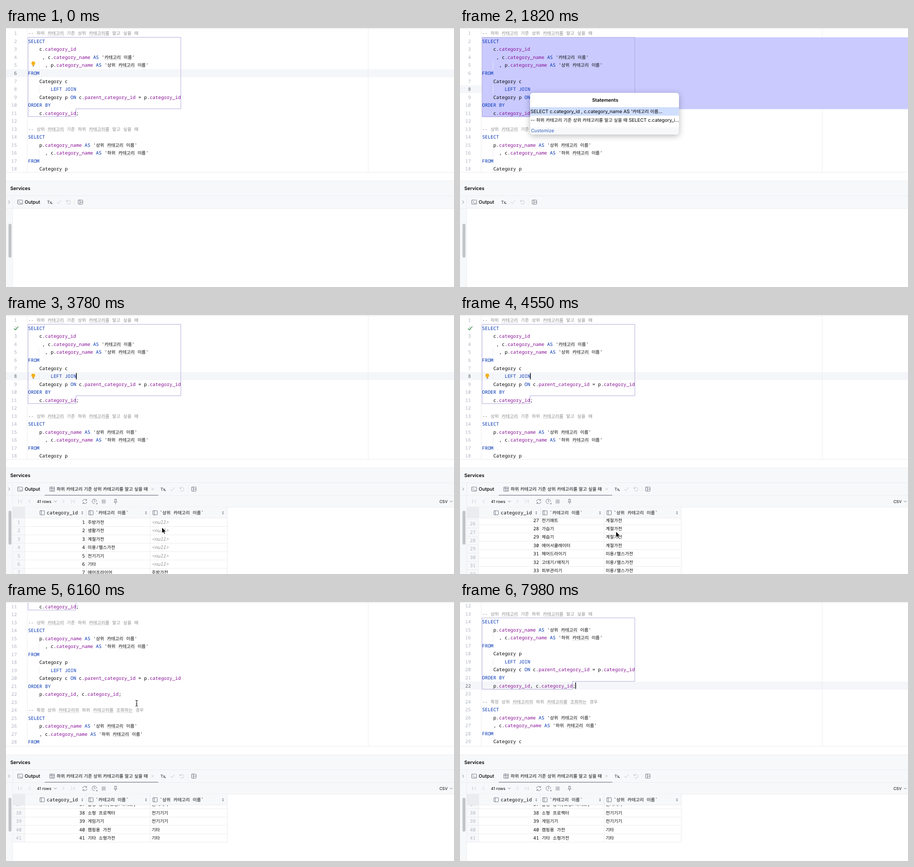
Animation of 984 by 569 pixels, one loop 8 s. Source, as an HTML page:

```html
<!DOCTYPE html>
<html lang="ko">
<head>
<meta charset="utf-8">
<title>SQL console</title>
<style>
html, body { margin: 0; width: 100%; height: 100%; overflow: hidden; background: #fff; }
svg { display: block; width: 984px; height: 569px; }
text { white-space: pre; text-rendering: geometricPrecision; }
.m { font: 500 10.355px "Noto Sans Mono", "Liberation Mono", monospace; }
.s { font-family: Inter, "Noto Sans CJK KR", "Noto Sans CJK", sans-serif; }
.k { font-family: "Noto Sans CJK KR", "Noto Sans CJK", "Noto Sans KR", sans-serif; font-size: 9.78px; font-weight: 400; font-style: normal; }
.i { fill: none; stroke: #6c707e; stroke-width: .95; stroke-linecap: round; stroke-linejoin: round; }
.d { stroke: #bfc2cc; }
</style>
</head>
<body>
<svg id="stage" viewBox="0 0 984 569" xmlns="http://www.w3.org/2000/svg"></svg>
<script>
(() => {
const LOOP = 8000, STEP = 70;
const CW = 6.213, KW = 9, X0 = 48.5, LH = 17.52, RH = 18.4;
const GREY = '#f7f8fa', LINE = '#ebecf0', INK = '#080808', DIM = '#aeb3c2';

const code = `-- 하위 카테고리 기준 상위 카테고리를 알고 싶을 때
SELECT
    c.category_id
     , c.category_name AS '카테고리 이름'
      , p.category_name AS '상위 카테고리 이름'
FROM
    Category c
        LEFT JOIN
    Category p ON c.parent_category_id = p.category_id
ORDER BY
    c.category_id;

-- 상위 카테고리 기준 하위 카테고리를 알고 싶을 때
SELECT
    p.category_name AS '상위 카테고리 이름'
      , c.category_name AS '하위 카테고리 이름'
FROM
    Category p
        LEFT JOIN
    Category c ON c.parent_category_id = p.category_id
ORDER BY
    p.category_id, c.category_id;

-- 특정 상위 카테고리의 하위 카테고리를 조회하는 경우
SELECT
    p.category_name AS '상위 카테고리 이름'
    , c.category_name AS '하위 카테고리 이름'
FROM
    Category c
        LEFT JOIN`.split('\n');

const items = ('주방가전,생활가전,계절가전,미용/헬스가전,전기기기,기타,' +
  '에어프라이어,전자레인지,전기밥솥,커피머신,믹서기/블렌더,토스터기,전기포트,식기세척기,인덕션,정수기,' +
  '청소기,로봇청소기,세탁기,건조기,공기청정기,다리미,의류관리기,' +
  '선풍기,에어컨,히터,전기매트,가습기,제습기,에어서큘레이터,' +
  '헤어드라이기,고데기/매직기,피부관리기,안마기,체중계,' +
  '무선 스피커,촬영 장비(조명/마이크),소형 프로젝터,게임기기,캠핑용 가전,기타 소형가전').split(',');
const groupEnds = [16, 23, 30, 35, 39, 41];

// drawing helpers
const runs = s => s.match(/[가-힣]+|[^가-힣]+/g) || [];
const isKo = s => /[가-힣]/.test(s);
const width = s => [...s].reduce((w, c) => w + (isKo(c) ? KW : CW), 0);
const esc = s => s.replace(/&/g, '&amp;').replace(/</g, '&lt;');
const rect = (x, y, w, h, fill, more = '') =>
  `<rect x="${x}" y="${y}" width="${w}" height="${h}" fill="${fill}" ${more}/>`;
const icon = (d, more = '') => `<path class="i ${more}" d="${d}"/>`;
const hline = (x, y, w) => rect(x, y, w, 1, LINE);
const vline = (x, y, h) => rect(x, y, 1, h, LINE);

function mono(x, y, s, fill = INK, more = '') {
  let out = '';
  for (const r of runs(s)) {
    out += `<tspan x="${x.toFixed(2)}"${isKo(r) ? ' class="k"' : ''}>${esc(r)}</tspan>`;
    x += width(r);
  }
  return `<text class="m" y="${(y + 3.7).toFixed(2)}" fill="${fill}" ${more}>${out}</text>`;
}

function sans(x, y, s, size = 10.4, weight = 400, fill = '#000', more = '') {
  const body = runs(s).map(r => isKo(r) ? `<tspan class="k">${r}</tspan>` : esc(r)).join('');
  return `<text class="s" x="${x}" y="${y + 3.75}" font-size="${size}" font-weight="${weight}" fill="${fill}" ${more}>${body}</text>`;
}

const lineMid = n => 11.7 + (n - 1) * LH;
const lineTop = n => 2.94 + (n - 1) * LH;

function codeLine(s, i) {
  const y = lineMid(i + 1);
  let x = X0, out = '';
  const parts = s.startsWith('--') ? [s] :
    s.split(/(\b(?:SELECT|FROM|LEFT|JOIN|ORDER|BY|AS|ON)\b|(?<=\.)[a-z_]+)/);
  parts.forEach((p, j) => {
    const fill = j % 2 ? (/[A-Z]/.test(p) ? '#0033b3' : '#871094') : s.startsWith('--') ? '#8c8c8c' : INK;
    if (p.trim()) out += mono(x, y, p, fill);
    x += width(p);
  });
  for (const w of s.matchAll(/카테고리[를의]?|조회하는/g)) {
    const a = X0 + width(s.slice(0, w.index));
    out += `<path fill="none" stroke="#b9bcc0" stroke-width=".7" d="M${a} ${y + 6}${'l1.5 -1.5l1.5 1.5'.repeat(w[0].length * 3)}"/>`;
  }
  if (/^ {6}/.test(s)) out += vline(72, lineTop(i + 1), LH);
  return out;
}

function outline(id, from, to, notch) {
  const a = lineTop(from), b = lineTop(to) - .7, c = lineTop(to + 1) - 1;
  return `<path id="${id}" fill="none" stroke="#a99fd8" stroke-width=".9" d="M${X0} ${a}H384V${b}H${notch}V${c}H${X0}Z"/>`;
}

function editor() {
  const nums = code.map((_, i) => {
    const s = `${i + 1}`;
    return mono(24 - CW * s.length, lineMid(i + 1), s, DIM, `id="n${s}"`);
  }).join('');
  return `<g clip-path="url(#edit)"><g id="row">${rect(0, 0, 984, LH, '#f5f6f9')}</g>
    ${vline(46, 2, 315)}${vline(795, 2, 315)}
    <g id="code">
      <path id="sel" fill="#cacaff" d="M${X0} ${lineTop(2)}H984V${lineTop(11)}H153.8V${lineTop(12)}H${X0}Z"/>
      ${outline('box1', 2, 11, 153.6)}${outline('box2', 14, 22, 247.3)}
      ${code.map(codeLine).join('')}${nums}
      <path id="check" fill="none" stroke="#4c9a5b" stroke-width="1.5" d="M17.5 29.5l3.2 3.2l6.5 -7.5"/>
      <g id="bulb"><circle cx="60" cy="-1.5" r="4.2" fill="#f5b01d"/>${rect(58, 1.5, 4, 2.2, '#f5b01d')}${rect(58.2, 4.2, 3.6, 1.2, '#6c707e')}</g>
      <rect id="caret" width="1.5" height="14" fill="#000"/>
    </g></g>`;
}

function panel() {
  return rect(0, 317, 984, 252, '#fff') + hline(0, 316.5, 984) +
    rect(0, 336, 984, 60, GREY) + hline(0, 335.5, 984) + hline(0, 368, 984) + hline(0, 396, 984) +
    rect(0, 397, 14, 172, GREY) + vline(14, 369, 200) +
    rect(5.5, 430, 6.5, 74.5, '#c3c4c7', 'rx="3.2"') +
    sans(9.5, 352.5, 'Services', 10.4, 600) + icon('M5.5 379.5l3 3l-3 3') +
    icon('M26.5 378h9a1 1 0 0 1 1 1v7a1 1 0 0 1 -1 1h-9a1 1 0 0 1 -1 -1v-7a1 1 0 0 1 1 -1zM28 380.5l2 2l-2 2M31.5 385h3') +
    sans(41, 382.5, 'Output', 10.4, 500) +
    `<g id="tools">${sans(90.3, 382.5, 'Tx', 9, 500, '#3c3f48')}${rect(99.5, 384.5, 2, 2, '#3c3f48')}
      ${icon('M112 383l3 3l6 -7', 'd')}${icon('M133 378.5v3h3M133.3 381.2a4.3 4.3 0 1 1 .4 4', 'd')}
      ${vline(150, 375, 15)}${icon('M159.5 378h8a1 1 0 0 1 1 1v7a1 1 0 0 1 -1 1h-8a1 1 0 0 1 -1 -1v-7a1 1 0 0 1 1 -1zM162.3 378v9M162.3 382.5h6')}</g>`;
}

const grid = (x, y) => icon(`M${x} ${y}h10v9h-10zM${x} ${y + 3}h10M${x + 3.4} ${y}v9M${x + 6.8} ${y + 3}v6`);
const column = x => icon(`M${x + 1} 430h8a1 1 0 0 1 1 1v7a1 1 0 0 1 -1 1h-8a1 1 0 0 1 -1 -1v-7a1 1 0 0 1 1 -1zM${x + 3.2} 430v9`);
const sorter = x => `<path fill="#6c707e" d="M${x - 2} 433.6l2 -2.4l2 2.4zM${x - 2} 435.6l2 2.4l2 -2.4z"/>`;

function result() {
  const bar = rect(15, 397, 969, 25, GREY) + hline(15, 421.5, 969) +
    icon('M27.5 406v7M35 406l-3.5 3.5l3.5 3.5M53.5 406l-3.5 3.5l3.5 3.5M124.3 406l3.5 3.5l-3.5 3.5M142.5 406l3.5 3.5l-3.5 3.5M149.8 406v7', 'd') +
    sans(68, 409.7, '41 rows', 8.8) + icon('M106 408.5l2.5 2.5l2.5 -2.5') +
    icon('M168.3 409a4.8 4.8 0 0 1 8.6 -2.2M177.8 410.4a4.8 4.8 0 0 1 -8.6 2.2M177.2 404.8v2.4h-2.4M168.9 414.6v-2.4h2.4') +
    icon('M199 409.5a5 5 0 1 0 -5 5M194 406.5v3.3l2.2 1.2') + `<path fill="#6c707e" d="M197.5 415.5l3.2 -3.2v3.2z"/>` +
    rect(210, 405.2, 9, 9, '#c6c8ce', 'rx="1.2"') +
    icon('M238.3 405h4.6M239 405v4l-2 2h7.2l-2 -2v-4M240.6 411v4') +
    sans(952, 409.7, 'CSV', 8.7) + icon('M975.5 408.5l2.5 2.5l2.5 -2.5');
  const tab = grid(96.5, 378) + sans(111.3, 382.5, code[0].slice(3)) +
    icon('M319.7 380l4.8 4.8M324.5 380l-4.8 4.8', 'd') + rect(85, 395, 249.5, 1.8, '#9da0a8');
  const head = rect(15, 422, 471, 24, GREY) + rect(15, 422, 26, 24, '#ebecf0') +
    [41, 176, 316, 485.5].map(x => vline(x, 422, 24)).join('') + hline(15, 445.5, 471) +
    column(74.5) + column(181.5) + column(322.5) + [167.5, 307.5, 476.5].map(sorter).join('') +
    mono(89.5, 434.5, 'category_id') + mono(196.5, 434.5, '`카테고리 이름`') + mono(337.3, 434.5, '`상위 카테고리 이름`');
  const h = RH * items.length;
  let cells = '', side = rect(15, 446, 26, h, GREY);
  items.forEach((name, i) => {
    const n = i + 1, s = `${n}`, y = 455.2 + i * RH, line = 445.7 + n * RH;
    const parent = i > 5 && items[groupEnds.findIndex(e => n <= e)];
    side += mono(28 - s.length * CW / 2, y, s, DIM) + hline(15, line, 26);
    cells += mono(173.5 - s.length * CW, y, s) + mono(179.5, y, name) + hline(41, line, 445) +
      (parent ? mono(320, y, parent) : mono(320, y, '<null>', '#8c8c8c', 'font-style="italic" style="font-style:italic"'));
  });
  cells += [176, 316, 485.5].map(x => vline(x, 446, h)).join('');
  side += vline(40.5, 446, h);
  return `<g id="tab">${bar}${tab}</g><g id="table">
    <g clip-path="url(#body)"><g id="cells">${cells}</g><g id="side">${side}</g></g>${head}</g>`;
}

function popup() {
  return `<g id="popup"><rect x="154" y="142.5" width="327" height="91.5" rx="6" fill="#fff" style="filter:drop-shadow(0 3px 7px rgba(0,0,0,.28))"/>
    ${rect(154, 174, 327, 18.5, '#d0dffd')}
    <path fill="${GREY}" d="M154 218H481V228a6 6 0 0 1 -6 6H160a6 6 0 0 1 -6 -6z"/>
    ${sans(319, 158.7, 'Statements', 10.4, 600, '#000', 'text-anchor="middle"')}
    ${sans(155, 183.5, "SELECT c.category_id , c.category_name AS '카테고리 이름...")}
    ${sans(155, 202.3, code[0] + ' SELECT c.category_i...')}
    ${sans(156, 225.5, 'Customize', 10.1, 400, '#315fbd')}</g>`;
}

const stage = document.getElementById('stage');
stage.innerHTML = `<defs><clipPath id="edit">${rect(0, 2, 984, 314.5, '#fff')}</clipPath>
  <clipPath id="body">${rect(15, 446, 472, 123, '#fff')}</clipPath></defs>
  ${rect(0, 0, 984, 569, '#fff')}${editor()}${rect(0, 1, 984, 1, '#e3e4e8')}${panel()}${result()}${popup()}
  <path id="arrow" d="M0 0V13L3 10.3L5 14.8L7.2 13.8L5.2 9.5H9.2Z" fill="#000" stroke="#fff" stroke-width=".9"/>
  <path id="beam" d="M-2.8 -6.3Q0 -6.3 0 -4.8Q0 -6.3 2.8 -6.3M0 -5V5M-2.8 6.3Q0 6.3 0 4.8Q0 6.3 2.8 6.3M-1.5 1.5H1.5" fill="none" stroke="#111" stroke-width="1.1"/>`;

const el = {};
stage.querySelectorAll('[id]').forEach(e => el[e.id] = e);
const show = (id, on) => el[id].setAttribute('visibility', on ? 'visible' : 'hidden');
const move = (id, x, y) => el[id].setAttribute('transform', `translate(${x} ${y})`);
const within = (t, a, b) => t >= a && t < b;

// linear track of [time, value...] keys
function track(keys, t) {
  const i = keys.findIndex(k => k[0] > t);
  if (i < 0) return keys[keys.length - 1].slice(1);
  if (!i) return keys[0].slice(1);
  const a = keys[i - 1], b = keys[i], f = (t - a[0]) / (b[0] - a[0]);
  return a.slice(1).map((v, j) => v + (b[j + 1] - v) * f);
}

const tableKeys = [[3800, 0], [4060, 110], [4480, 456.6], [4550, 482.6], [4690, 673]];
const editorKeys = [[5460, 0], [5530, 13.6], [5740, 70], [6160, 177], [6300, 192], [6440, 195.8]];
const mouseKeys = [[70, 478, 475], [280, 329, 230], [350, 329, 230], [770, 215, 136], [1050, 222, 140],
  [2590, 222, 140], [2600, 555.5, 498.5], [3220, 555.5, 498.5], [3230, 475, 510], [3640, 342.5, 466.5], [3800, 342.5, 466.5],
  [4200, 342.5, 475.5], [4970, 342.5, 475.5], [5320, 287, 222.5], [6580, 287, 222.5], [6720, 283, 196],
  [6930, 266, 146], [7350, 257, 184], [7420, 257, 184], [7490, 265, 185], [7560, 260, 184]];

function draw(t) {
  const scroll = track(editorKeys, t)[0];
  const line = t < 760 ? 6 : t < 7350 ? 8 : 22;
  move('code', 0, -scroll);
  move('row', 0, lineTop(line) - scroll);
  for (const n of [6, 8, 22]) el['n' + n].setAttribute('fill', n === line ? '#5f6372' : DIM);

  show('sel', within(t, 1610, 2380));
  show('popup', within(t, 1680, 2380));
  el.popup.setAttribute('opacity', Math.max(0, Math.min(1, .5 + (t - 1680) / 280)));
  show('box1', t < 7840);
  show('box2', t >= 7840);
  show('check', t >= 2450);
  show('bulb', t < 760 || t >= 2520);
  move('bulb', 0, t < 760 ? 79 : lineMid(8));

  const blink = t >= 2420 && Math.floor((t - 2420) / 525) % 2 === 0;
  show('caret', t >= 7490 || t < 7350 && (within(t, 760, 1260) || blink));
  move('caret', t < 7350 ? 153.8 : 253.2, lineMid(line) - 7);

  show('tab', t >= 2450);
  show('table', t >= 2520);
  move('tools', t >= 2450 ? 249 : 0, 0);
  move('cells', 0, -track(tableKeys, t)[0]);
  move('side', 0, -track(tableKeys, t - STEP)[0]);

  const [x, y] = track(mouseKeys, t);
  const seen = within(t, 70, 1610) || within(t, 2660, 2940) || within(t, 3290, 7980);
  const inEditor = y < 317;
  show('arrow', seen && !inEditor);
  show('beam', seen && inEditor);
  move('arrow', x, y);
  move('beam', x, y);
}

const start = performance.now();
function tick() {
  const t = (performance.now() - start) % LOOP;
  draw(Math.floor(t / STEP) * STEP);
  requestAnimationFrame(tick);
}
draw(0);
requestAnimationFrame(tick);
})();
</script>
</body>
</html>
```
